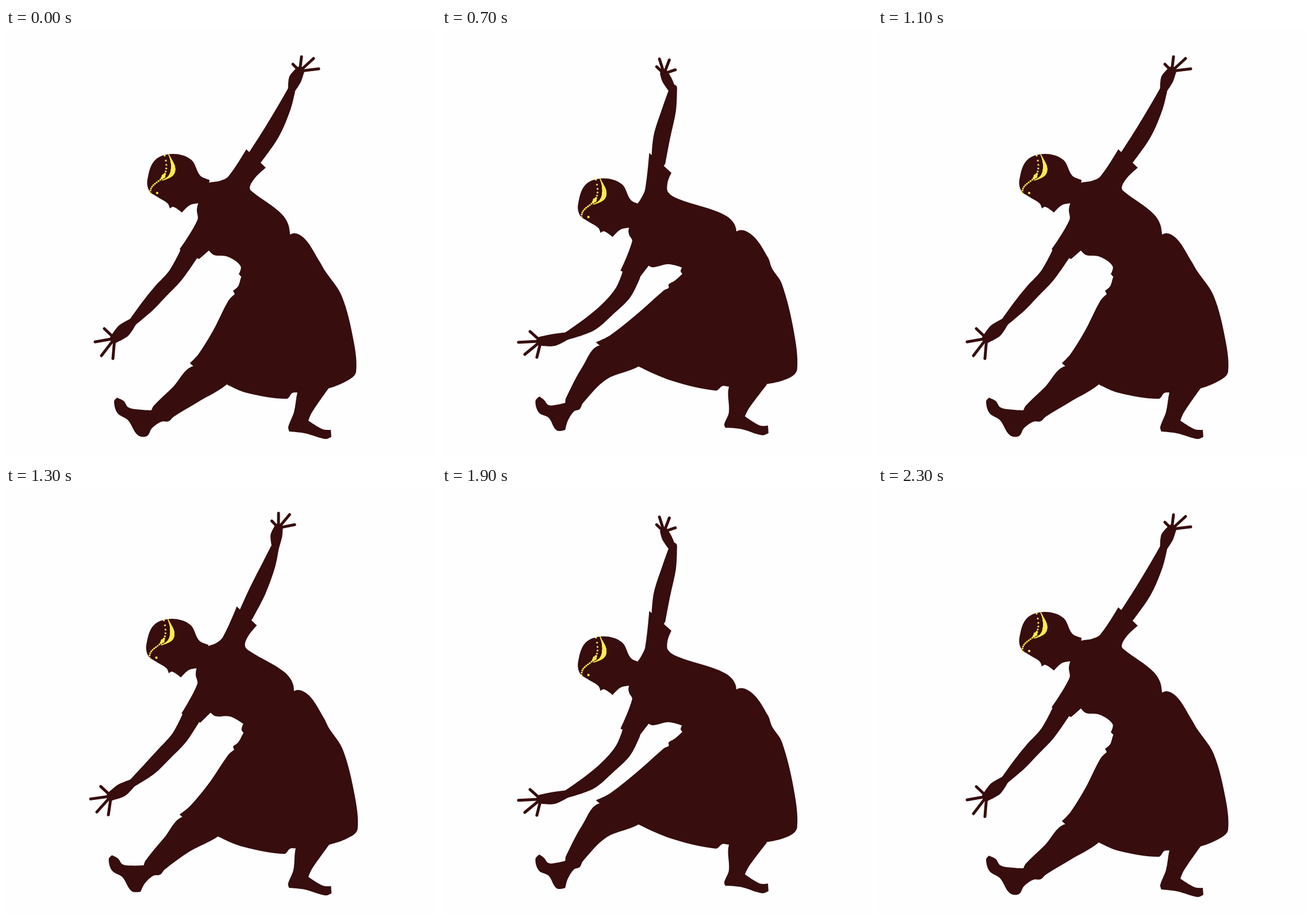
Write an HTML page with a canvas that moves like this. It is 748x748 px and loops after 2400 ms.

```html
<!DOCTYPE html>
<html lang="en">
<head>
<meta charset="utf-8">
<title>Dancer</title>
<style>
html, body { margin: 0; height: 100%; overflow: hidden; background: #fefefe; }
canvas { display: block; width: 100vw; height: 100vh; }
</style>
</head>
<body>
<canvas id="stage" width="748" height="748"></canvas>
<script>
const ctx = document.getElementById('stage').getContext('2d');
const DARK = '#370d0e', YELLOW = '#feec50', PAPER = '#fefefe';

const points = text => text.trim().split(/\s+/).map(p => p.split(',').map(Number));
const shift = (list, dx, dy) => list.map(([x, y]) => [x + dx, y + dy]);
const mix = (a, b, t) => a + (b - a) * t;
const turn = (x, y, a) => [x * Math.cos(a) - y * Math.sin(a), x * Math.sin(a) + y * Math.cos(a)];
const centre = list => [0, 1].map(i => list.reduce((s, p) => s + p[i], 0) / list.length);

// Moves key points from upright to bent in three steps along their best-fit
// rotation, then drifts by [dx, dy, angle] in every later step.
function part(draw, from, to, [dx, dy, spin]) {
  const a = centre(from), b = centre(to);
  let dot = 0, cross = 0;
  from.forEach(([x, y], i) => {
    const u = x - a[0], v = y - a[1], p = to[i][0] - b[0], q = to[i][1] - b[1];
    dot += u * p + v * q;
    cross += u * q - v * p;
  });
  const angle = Math.atan2(cross, dot);
  return step => {
    const t = Math.min(step, 3) / 3, late = Math.max(0, step - 3);
    draw(from.map(([x, y, r], i) => {
      const end = turn(to[i][0] - b[0], to[i][1] - b[1], -angle);
      const p = turn(mix(x - a[0], end[0], t), mix(y - a[1], end[1], t), angle * t + spin * late);
      const moved = [p[0] + mix(a[0], b[0], t) + dx * late, p[1] + mix(a[1], b[1], t) + dy * late];
      return r ? [...moved, mix(r, to[i][2], t)] : moved;
    }));
  };
}

function disc(x, y, r) {
  ctx.beginPath();
  ctx.arc(x, y, r, 0, 7);
  ctx.fill();
}

// Handle direction at a point, or none where the outline has a corner.
function tangent(a, p, b) {
  const ux = p[0] - a[0], uy = p[1] - a[1], vx = b[0] - p[0], vy = b[1] - p[1];
  const cos = (ux * vx + uy * vy) / (Math.hypot(ux, uy) * Math.hypot(vx, vy));
  const n = Math.hypot(ux + vx, uy + vy);
  return cos < .4 ? [0, 0] : [(ux + vx) / n, (uy + vy) / n];
}

function blob(list) {
  const at = i => list[(i + list.length) % list.length];
  const dirs = list.map((p, i) => tangent(at(i - 1), p, at(i + 1)));
  ctx.beginPath();
  ctx.moveTo(...list[0]);
  list.forEach((p, i) => {
    const q = at(i + 1), d = dirs[i], e = dirs[(i + 1) % list.length];
    const h = Math.hypot(q[0] - p[0], q[1] - p[1]) / 3;
    ctx.bezierCurveTo(p[0] + d[0] * h, p[1] + d[1] * h, q[0] - e[0] * h, q[1] - e[1] * h, ...q);
  });
  ctx.fill();
}

// Joints x,y,radius make the flesh; points without a radius are fingertips.
function limb(list) {
  const joints = list.filter(p => p.length > 2), tips = list.filter(p => p.length < 3);
  const last = joints.length - 1;
  const side = s => joints.map(([x, y, r], i) => {
    const a = joints[Math.max(0, i - 1)], b = joints[Math.min(last, i + 1)];
    const n = Math.hypot(b[0] - a[0], b[1] - a[1]);
    return [x - s * r * (b[1] - a[1]) / n, y + s * r * (b[0] - a[0]) / n];
  });
  blob([...side(1), ...side(-1).reverse()]);
  disc(...joints[0]);
  disc(...joints[last]);
  for (const tip of tips) {
    ctx.beginPath();
    ctx.moveTo(joints[last][0], joints[last][1]);
    ctx.lineTo(...tip);
    ctx.stroke();
  }
}

const bezier = (p, t) => [0, 1].map(i => (1 - t) ** 3 * p[0][i] + 3 * t * (1 - t) ** 2 * p[1][i]
  + 3 * t * t * (1 - t) * p[2][i] + t ** 3 * p[3][i]);

// Two curves of four control points, then the mark on the forehead.
function jewels(p) {
  ctx.fillStyle = YELLOW;
  for (let t = 0; t <= 1; t += .01) disc(...bezier(p.slice(0, 4), t), .8 + 3 * Math.sin(Math.PI * t) ** 2);
  for (let i = 0; i <= 16; i++) {
    const t = i / 16;
    disc(...bezier(p.slice(4, 8), t), 1.6 + 1.8 * Math.exp(-(((t - .38) / .06) ** 2)));
  }
  disc(...p[8], 2.1);
}

const head = points(`246,264 259,230 290,219 322,229 338,257 354,264 345,300 320,308 306,321 291,311
  285,314 281,305 262,293 249,283`);
const gems = points('283,220 293,241 297,257 271,265 276,222 290,272 250,262 251,287 263,287');

const skirt = part(blob,
  points(`411,430 404,449 395,457 398,463 387,474 361,525 335,567 320,583 326,588 384,620 420,635 488,645
    498,635 507,634 561,627 598,611 609,598 605,546 584,466 554,421 546,407 519,366 497,358 440,400`),
  points(`421,424 404,439 394,445 394,451 386,455 345,491 292,533 267,545 273,550 340,587 400,613 475,630
    487,622 498,623 564,619 604,608 617,593 611,525 591,445 574,418 567,399 541,361 515,352 450,400`),
  [.5, .8, -.004]);

const frontLeg = part(blob,
  points(`326,588 290,625 257,657 253,665 235,664 213,660 205,649 193,643 188,650 194,670 212,682 229,708
    245,710 254,696 270,685 283,684 292,676 335,650 384,620 400,595`),
  points(`273,550 243,587 214,642 213,650 200,653 184,654 176,645 168,639 161,647 167,667 184,676 198,698
    213,697 217,682 228,665 238,661 244,650 285,609 340,587 370,560`),
  [1.5, 2, 0]);

const backLeg = part(blob,
  points(`507,633 501,668 491,694 493,702 520,705 556,715 566,711 565,699 551,698 526,683 532,669
    561,627 540,600 515,610`),
  points(`498,623 498,667 490,688 492,694 519,696 556,707 567,703 566,690 552,690 526,674 533,660
    564,619 545,600 515,605`),
  [1, 1.5, 0]);

const torso = part(blob,
  points(`335,303 332,316 333,334 302,385 336,402 353,387 362,395 386,398 408,414 405,428 430,445 490,420
    493,350 479,323 430,286 424,278 433,261 452,243 418,211 387,258 372,266 354,269 346,275`),
  points(`328,345 329,354 334,365 313,416 344,431 362,408 370,411 397,406 420,412 418,420 440,440 510,420
    515,346 496,322 416,293 398,281 397,265 404,247 366,212 358,275 350,292 345,299 340,305`),
  [-3.5, 5, -.015]);

const raisedArm = part(limb,
  points('434,224,13.5 462,182,14.5 485,137,11 497,107,6.5'),
  points('383,224,12.5 390,182,14.5 404,134,12 412,98,6.5'),
  [-8, 7, -.025]);

const raisedHand = part(limb,
  points('497,107,6.5 503,89,11 511,75,8 499,63 514,50 535,53 544,71'),
  points('412,98,6.5 404,80,8.5 400,69,7 388,56 394,43 411,46 420,64'),
  [-14, 10, -.08]);

const loweredArm = part(limb,
  points('318,393,16 295,430,13.5 268,459,13 246,484,11.5 221,511,7'),
  points('329,423,16 315,453,15 288,482,13 257,508,13 216,529,6.5'),
  [0, 7.3, 0]);

const loweredHand = part(limb,
  points('221,511,7 205,526,12 189,540,8 171,523 155,546 166,570 186,575'),
  points('216,529,6.5 193,536,10.5 171,538,8 152,521 132,540 143,561 164,566'),
  [1, 6.8, 0]);

const figure = [skirt, frontLeg, backLeg, torso, raisedArm, raisedHand, loweredArm, loweredHand,
  part(blob, head, shift(head, -5.5, 35.8), [-3.8, 6.8, 0]),
  part(jewels, gems, shift(gems, -4.3, 35), [-4, 6.8, 0])];

function draw(step) {
  ctx.fillStyle = PAPER;
  ctx.fillRect(0, 0, 748, 748);
  ctx.fillStyle = ctx.strokeStyle = DARK;
  ctx.lineWidth = 5;
  ctx.lineCap = 'round';
  figure.forEach(pose => pose(step));
}

const start = performance.now();
function tick() {
  const n = Math.floor((performance.now() - start) % 1200 / 100);
  draw(Math.min(n, 5, 11 - n)); // bend down, hold, rise, hold
  requestAnimationFrame(tick);
}
tick();
</script>
</body>
</html>
```
